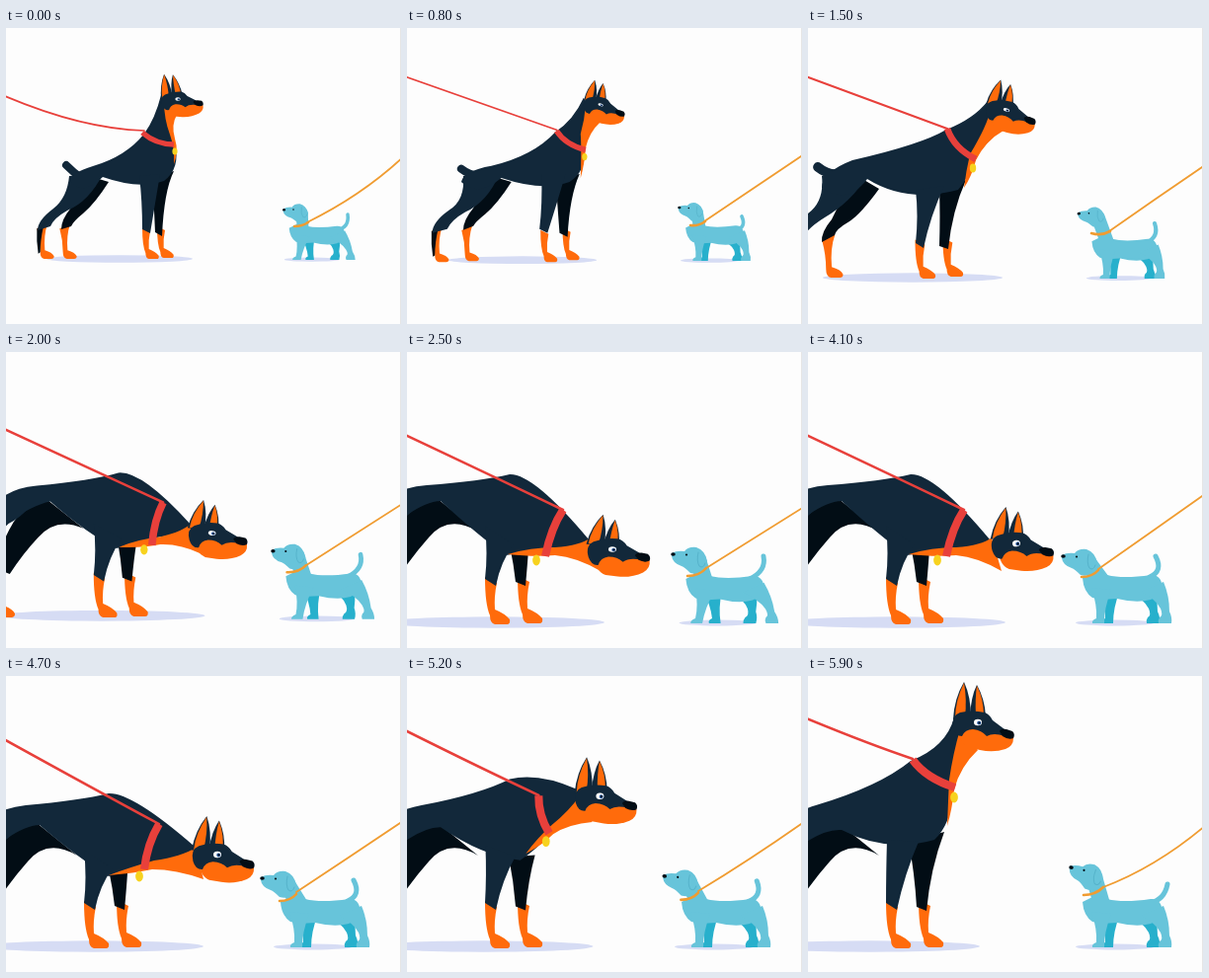
An HTML page that plays this animation: 400 px wide and 300 px high, repeating every 6000 ms.

```html
<!DOCTYPE html>
<html lang="en">
<head>
<meta charset="utf-8">
<title>Two dogs meet</title>
<style>
html, body { margin: 0; width: 100%; height: 100%; overflow: hidden; background: #fdfdfd; }
svg { display: block; width: 100vw; height: 100vh; }
</style>
</head>
<body>
<svg id="stage" viewBox="0 0 400 300"></svg>
<script>
const LOOP = 6000, STEP = 100;
const C = {
  navy: '#12283a', black: '#020d15', orange: '#ff6b0b', red: '#e8403b', tag: '#f7d21e',
  shade: '#d6dcf4', pup: '#67c4da', pupMid: '#56b3cb', pupDark: '#27b0cc', lead: '#f09c31'
};

const stage = document.getElementById('stage');
function add(parent, tag, attrs) {
  const el = document.createElementNS('http://www.w3.org/2000/svg', tag);
  for (const k in attrs) el.setAttribute(k, attrs[k]);
  return parent.appendChild(el);
}
const set = (el, k, v) => el.setAttribute(k, v);
const group = parent => add(parent, 'g', {});
const shape = (parent, fill, d = '') => add(parent, 'path', { fill, d });
const line = (parent, stroke, width, cap = 'round') =>
  add(parent, 'path', { fill: 'none', stroke, 'stroke-width': width, 'stroke-linecap': cap });
const oval = (parent, fill, cx, cy, rx, ry) => add(parent, 'ellipse', { fill, cx, cy, rx, ry });

const clamp = u => Math.max(0, Math.min(1, u));
const smooth = u => u * u * (3 - 2 * u);
const easeIn = u => Math.pow(u, 1.8);
const easeOut = u => 1 - (1 - u) * (1 - u);
const lerp = (a, b, u) => a + (b - a) * u;

// Slow push-in of the view
function view(t) {
  const k = smooth(clamp((t - 600) / 1900));
  return { s: 1 + k / 2, x: -127.5 * k, y: -78 * k };
}

const NUM = /-?\d+(\.\d+)?/g;

// Turns a pose drawn in stage units at time t into scene units
function scene(pose, t) {
  const v = view(t), out = {};
  const put = (n, i) => (n - (i % 2 ? v.y : v.x)) / v.s;
  for (const k in pose) {
    let i = 0;
    out[k] = typeof pose[k] === 'string'
      ? pose[k].replace(NUM, n => put(+n, i++).toFixed(2))
      : pose[k].map((n, j) => j < 2 ? put(n, j) : n);
  }
  return out;
}

function mix(a, b, u) {
  if (a === b || u === 0) return a;
  const out = {};
  for (const k in a) {
    if (typeof a[k] === 'string') {
      const to = b[k].match(NUM);
      let i = 0;
      out[k] = a[k].replace(NUM, n => lerp(+n, +to[i++], u).toFixed(2));
    } else out[k] = a[k].map((n, i) => lerp(n, b[k][i], u));
  }
  return out;
}

// keys: [time, pose, ease into it]
function poseAt(keys, t) {
  let i = 1;
  while (i < keys.length - 1 && keys[i][0] < t) i++;
  const [t0, a] = keys[i - 1], [t1, b, ease = smooth] = keys[i];
  return mix(a, b, ease(clamp((t - t0) / (t1 - t0))));
}

// ---- big dog poses; head: eye x, y, turn, ear turn, ear size, lid
const far = scene({
  body: 'M64,154 Q66,147 88,140 Q122,130 140,107 Q151,92 157,68 L170,82 Q164,100 171,118 Q177,142 160,155 Q135,164 98,151 Q76,172 64,154Z',
  chest: 'M160,74 Q160,92 166,108 Q171,122 170,138 Q175,125 171,112 Q167,98 173,88Z',
  nearFore: 'M135,150 L156,148 Q152,172 146,208 L138,204 Q138,175 135,150Z',
  farFore: 'M148,152 L170,145 Q160,165 158,211 L151,207 Q150,180 148,152Z',
  farHind: 'M104,156 Q90,178 78,188 Q68,196 66,201 L56,204 Q56,194 66,182 Q74,166 84,150Z',
  nearHind: 'M98,148 Q84,176 62,185 Q48,193 45,201 L32,205 Q32,195 48,183 Q62,172 64,150Z',
  tail: 'M76,152 Q68,146 61,139',
  collar: 'M138,106 Q152,118 170,118',
  lead: 'M-30,56 Q66,102 140,104',
  nf: [136, 234], ff: [151, 233], nh: [32, 234], fh: [55, 234],
  tag: [171, 125], shadow: [189, 234], head: [174, 72, -10, 0, 1, .8]
}, 0);

const lunge = scene({
  body: 'M58,156 Q60,145 88,140 Q130,130 152,106 Q170,94 180,72 L192,92 Q184,108 181,124 Q182,146 166,156 Q140,166 98,152 Q74,172 58,156Z',
  chest: 'M182,80 Q181,94 177,108 Q178,122 177,152 Q181,138 182,122 Q186,106 196,97Z',
  nearFore: 'M138,148 L162,148 Q154,175 144,207 L136,203 Q139,178 138,148Z',
  farFore: 'M152,152 L176,148 Q166,170 164,211 L156,207 Q154,180 152,152Z',
  farHind: 'M108,156 Q94,178 82,188 Q72,196 70,200 L60,204 Q60,194 70,182 Q78,166 88,150Z',
  nearHind: 'M96,148 Q84,176 62,186 Q48,194 44,203 L29,207 Q29,196 46,184 Q62,174 60,150Z',
  tail: 'M74,150 Q66,149 58,143',
  collar: 'M153,105 Q162,119 182,124',
  lead: 'M-40,36 Q76,77 153,104',
  nf: [135, 236], ff: [157, 234], nh: [29, 236], fh: [59, 235],
  tag: [181, 131], shadow: [193, 234], head: [197, 79, 2, 8, .86, .6]
}, 0);

const lean = scene({
  body: 'M14,162 Q14,146 45,134 Q115,118 140,103 Q168,92 182,74 L200,98 Q184,112 172,128 Q164,150 152,164 Q100,178 60,153 Q40,180 14,162Z',
  chest: 'M185,82 Q182,98 164,128 Q160,145 158,162 Q166,150 170,134 Q180,114 198,104Z',
  nearFore: 'M109,164 L138,160 Q124,190 117,223 L109,218 Q112,190 109,164Z',
  farFore: 'M133,164 L160,154 Q146,185 142,224 L133,221 Q134,190 133,164Z',
  farHind: 'M72,163 Q54,188 42,196 Q28,204 27,210 L14,217 Q13,207 24,194 Q34,172 50,150Z',
  nearHind: 'M60,150 Q44,176 17,192 Q-1,203 -6,214 L-24,219 Q-24,205 -3,190 Q17,178 14,150Z',
  tail: 'M30,148 Q20,149 10,141',
  collar: 'M141,102 Q148,122 170,133',
  lead: 'M-40,35 Q70,76 141,102',
  nf: [106, 254], ff: [134, 252], nh: [-22, 254], fh: [15, 253],
  tag: [167, 142], shadow: [197, 253], head: [201, 83, 3, 10, .86, .6]
}, 1500);

const lowDraw = {
  body: 'M-30,190 Q-40,140 20,135 Q75,131 104,124 Q128,123 184,190 L190,206 Q165,196 142,199 Q118,203 100,206 Q72,186 34,151 Q10,152 -30,190Z',
  chest: 'M186,188 Q176,196 150,198 Q125,198 102,205 Q130,208 150,206 Q172,208 196,222Z',
  nearFore: 'M79,176 L108,195 Q95,212 90,237 L79,230 Q82,205 79,176Z',
  farFore: 'M104,196 L123,200 Q122,215 120,237 L110,233 Q108,215 104,196Z',
  farHind: 'M72,182 Q42,164 22,188 Q6,206 -10,230 L-25,222 Q-20,196 -5,170 Q10,150 30,148Z',
  nearHind: 'M20,136 Q14,160 -10,172 Q-40,200 -50,230 L-64,222 Q-64,200 -50,185 Q-34,170 -30,150Z',
  tail: 'M-30,150 Q-40,146 -50,140',
  collar: 'M158,160 Q146,178 140,207',
  lead: 'M-40,66 Q79,122 158,160',
  nf: [76, 276], ff: [109, 275], nh: [-70, 276], fh: [-30, 276],
  tag: [131, 211], shadow: [200, 274], head: [208, 200, -7, 18, .86, .8]
};
const sniffDraw = { ...lowDraw, head: [211, 194, -6, 14, .9, 1] };
const liftDraw = {
  ...lowDraw,
  body: 'M-30,190 Q-40,138 20,131 Q75,126 104,119 Q128,118 190,172 L192,196 Q165,182 144,192 Q118,198 104,203 Q72,184 34,151 Q10,152 -30,190Z',
  chest: 'M192,174 Q178,183 150,187 Q125,194 104,202 Q130,200 148,196 Q172,196 200,206Z',
  collar: 'M155,150 Q143,170 140,196',
  lead: 'M-40,43 Q77,108 155,150',
  tag: [135, 203], head: [214, 181, -4, 11, .95, 1]
};
const tallDraw = {
  ...lowDraw,
  body: 'M-30,190 Q-40,145 8,131 Q72,112 104,86 Q140,72 148,42 L166,74 Q150,98 146,120 Q145,150 128,166 Q80,180 34,156 Q10,154 -30,190Z',
  chest: 'M154,54 Q147,78 143,105 Q142,125 141,152 Q146,135 148,115 Q154,92 172,75Z',
  nearFore: 'M80,166 L112,168 Q98,200 90,237 L79,230 Q79,200 80,166Z',
  farFore: 'M102,168 L138,158 Q124,195 120,238 L110,234 Q108,200 102,168Z',
  collar: 'M106,85 Q120,104 149,113',
  lead: 'M-40,27 Q52,66 106,84',
  tag: [148, 123], shadow: [174, 274], head: [172, 47, 0, 0, 1, 1]
};
const [low, sniff, lift, tall] = [lowDraw, sniffDraw, liftDraw, tallDraw].map(p => scene(p, 2500));
const proud = { ...tall, head: [...tall.head.slice(0, 2), -4, 0, 1, 1] };

const dogKeys = [
  [0, far], [750, lunge], [1150, lunge], [1500, lean, easeIn], [2250, low, easeOut],
  [2600, low], [3400, sniff], [4250, sniff], [4700, lift], [4900, lift],
  [5550, proud], [5900, tall], [LOOP, tall]
];

// ---- puppy poses; at: x, ground, size, stride; head: x, y, turn, size
const pup = (at, head, tail, collar, lead) => ({ at, head, tail, collar, lead });
const pupStand = pup([297, 275, 1, 0], [283, 214, 0, 1],
  'M346,228 Q360,222 352,207', 'M277,228 Q288,228 294,221', 'M294,220 Q347,183 402,144');
const pupWalk = pup([300, 235, .7, 5], [299, 188, -4, .7],
  'M335,205 Q348,202 346,189', 'M292,201 Q300,201 306,197', 'M305,197 Q360,170 402,131');
const pupStop = pup([296, 236, .73, 0], [293, 187, 0, .7],
  'M333,205 Q344,202 339,191', 'M287,200 Q295,201 302,196', 'M301,196 Q350,163 402,128');
const pupLook = pup([303, 254, .82, 0], [293, 192, -4, .75],
  'M342,218 Q356,212 351,198', 'M287,208 Q297,211 306,206', 'M305,206 Q352,173 402,139');
const pupStep = pup([301, 275, .98, 5], [294, 212, 0, 1],
  'M347,230 Q364,222 361,207', 'M284,227 Q296,227 303,219', 'M303,219 Q351,189 402,157');
const pupNose = { ...pupStand, head: [284, 212, 0, 1], lead: 'M294,219 Q347,184 402,147' };
const pupUp = pup([297, 275, 1, 0], [289, 205, 10, .98],
  'M346,230 Q361,227 364,211', 'M279,222 Q291,222 299,214', 'M299,214 Q352,194 402,152');

const pupKeys = [
  [0, pupWalk], [750, pupStop], [850, pupStop], [1500, pupLook, easeIn], [2400, pupStep, easeOut],
  [2600, pupStep], [3300, pupStand], [4250, pupStand], [4700, pupNose], [4950, pupNose], [5850, pupUp], [LOOP, pupUp]
];

// ---- puppy drawing
const FORE = 'M-9,-6 Q-3,12 -4,25 Q-9,27 -8,30 L4,30 Q4,14 11,-4Z';
const HIND = 'M-16,2 Q0,9 5,19 Q8,26 4,28 Q2,31 3,34 L16,34 Q17,28 14,22 Q14,6 8,-8Z';
const p = { all: group(stage) };
oval(p.all, C.shade, 14, -.5, 40, 3);
const leg = (parent, d, fill, x, y, dir) => ({ el: shape(parent, fill, d), x, y, dir });
p.legs = [leg(p.all, FORE, C.pupDark, 8, -30, 1), leg(p.all, HIND, C.pupDark, 43, -34, -1)];
p.neck = line(stage, C.pup, 17);
p.tail = line(stage, C.pup, 5);
p.top = group(stage);
shape(p.top, C.pup, 'M-19,-46 Q-18,-32 -9,-26 L0,-24 L16,-25 Q36,-20 50,-24 L62,-30 Q63,-50 50,-49 Q22,-45 6,-49 L-3,-54Z');
p.legs.push(leg(p.top, FORE, C.pup, -1, -30, -1), leg(p.top, HIND, C.pup, 55, -34, 1));
p.head = group(stage);
shape(p.head, C.pup, 'M-26,-8 Q-21,-11 -13,-10 Q-9,-15 -1,-14 Q8,-11 10,0 L8,10 Q0,14 -7,12 Q-13,6 -16,5 Q-25,2 -26,-5Z');
const ear = line(p.head, C.pupMid, 1);
set(ear, 'd', 'M1,-9 Q-1,0 2,5 Q6,8 8,2');
oval(p.head, C.black, -24.5, -7, 2.3, 1.8);
oval(p.head, C.black, -11, -6.5, 1.1, 1.1);
p.collar = line(stage, C.lead, 2.6);
p.lead = line(stage, C.lead, 1.8);

function drawPup(q) {
  const [x, y, s, stride] = q.at, [hx, hy, turn, hs] = q.head;
  const tf = `translate(${x} ${y}) scale(${s})`;
  set(p.all, 'transform', tf);
  set(p.top, 'transform', tf);
  for (const l of p.legs)
    set(l.el, 'transform', `matrix(1 0 ${l.dir * stride / 30} 1 ${l.x} ${l.y})`);
  set(p.neck, 'd', `M${hx + hs},${hy} L${x + s},${y - 42 * s}`);
  set(p.neck, 'stroke-width', 17 * s);
  set(p.tail, 'stroke-width', 5 * s);
  set(p.head, 'transform', `translate(${hx} ${hy}) rotate(${turn}) scale(${hs})`);
  for (const k of ['tail', 'collar', 'lead']) set(p[k], 'd', q[k]);
}

// ---- big dog drawing
const FORE_FOOT = 'M3,-48 L15,-42 Q12,-28 13,-15 Q23,-11 28,-5 Q29,0 25,0 L13,0 Q8,-1 8,-9 Q3,-20 3,-48Z';
const HIND_FOOT = 'M-1,-46 L15,-53 Q9,-36 11,-13 Q22,-10 25,-4 Q25,0 21,0 L10,0 Q4,-1 4,-10 Q4,-28 -1,-46Z';
const cam = group(stage), d = {};
d.shadow = oval(cam, C.shade, 0, 0, 74, 3.8);
d.fh = shape(cam, C.orange, HIND_FOOT);
d.farHind = shape(cam, C.black);
d.ff = shape(cam, C.orange, FORE_FOOT);
d.farFore = shape(cam, C.black);
d.tail = line(cam, C.navy, 8);
d.nh = group(cam);
shape(d.nh, C.orange, HIND_FOOT);
shape(d.nh, C.black, 'M-1,-46 L9,-50 Q4,-28 4,-10 L1,-8 Q-2,-28 -1,-46Z');
d.nearHind = shape(cam, C.navy);
d.body = shape(cam, C.navy);
d.nf = shape(cam, C.orange, FORE_FOOT);
d.nearFore = shape(cam, C.navy);
d.chest = shape(cam, C.orange);
d.head = group(cam);
d.ears = group(d.head);
shape(d.ears, C.navy, 'M-8,-6 Q-7,-26 -1,-38 Q7,-24 8,-6Z');
shape(d.ears, C.orange, 'M-2,-6 Q-3,-24 -1,-37 Q6,-24 6,-6Z');
shape(d.ears, C.navy, 'M-25,-3 Q-24,-24 -14,-41 Q-7,-26 -7,-5Z');
shape(d.ears, C.orange, 'M-23,-4 Q-23,-22 -14,-40 Q-11,-24 -13,-5Z');
shape(d.head, C.orange, 'M-18,5 L24,8 L36,16 Q36,24 28,27 Q16,31 2,28 L-10,25 Q-20,20 -18,5Z');
shape(d.head, C.navy, 'M-25,5 Q-27,-7 -18,-10 Q-6,-13 7,-10 Q12,-8 15,-2 L27,7 L27,14 Q16,10 9,14 Q4,8 -5,7 Q-13,7 -16,14 Q-23,14 -25,5Z');
shape(d.head, C.black, 'M22,9 Q23,6 29,7 L35,9 Q38,12 36,16 Q31,18 25,14Z');
d.eye = group(d.head);
oval(d.eye, '#fff', 0, 0, 4, 3.3);
oval(d.eye, '#2b5fa8', 1.2, .5, 2, 2);
oval(d.eye, C.black, 1.5, .5, 1.1, 1.1);
d.tag = oval(cam, C.tag, 0, 0, 2.6, 3.6);
d.collar = line(cam, C.red, 5.4, 'butt');
d.lead = line(cam, C.red, 1.7);

function drawDog(q, t) {
  const v = view(t);
  set(cam, 'transform', `translate(${v.x} ${v.y}) scale(${v.s})`);
  for (const k in q) if (typeof q[k] === 'string') set(d[k], 'd', q[k]);
  for (const k of ['nf', 'ff', 'nh', 'fh'])
    set(d[k], 'transform', `translate(${q[k]}) scale(.667)`);
  set(d.tag, 'transform', `translate(${q.tag})`);
  set(d.shadow, 'transform', `translate(${q.shadow[0] - 74} ${q.shadow[1]})`);
  const [x, y, turn, earTurn, earSize, lid] = q.head;
  set(d.head, 'transform', `translate(${x} ${y}) rotate(${turn}) scale(.667)`);
  set(d.ears, 'transform', `translate(-10 -8) rotate(${earTurn}) scale(1 ${earSize}) translate(10 8)`);
  set(d.eye, 'transform', `rotate(${(1 - lid) * 40}) scale(1 ${lid})`);
}

add(stage, 'rect', { x: 399, y: 0, width: 1, height: 300, fill: '#e6e6e6' });

function frame() {
  const t = Math.floor(performance.now() % LOOP / STEP) * STEP;
  drawPup(poseAt(pupKeys, t));
  drawDog(poseAt(dogKeys, t), t);
  requestAnimationFrame(frame);
}
frame();
</script>
</body>
</html>
```
